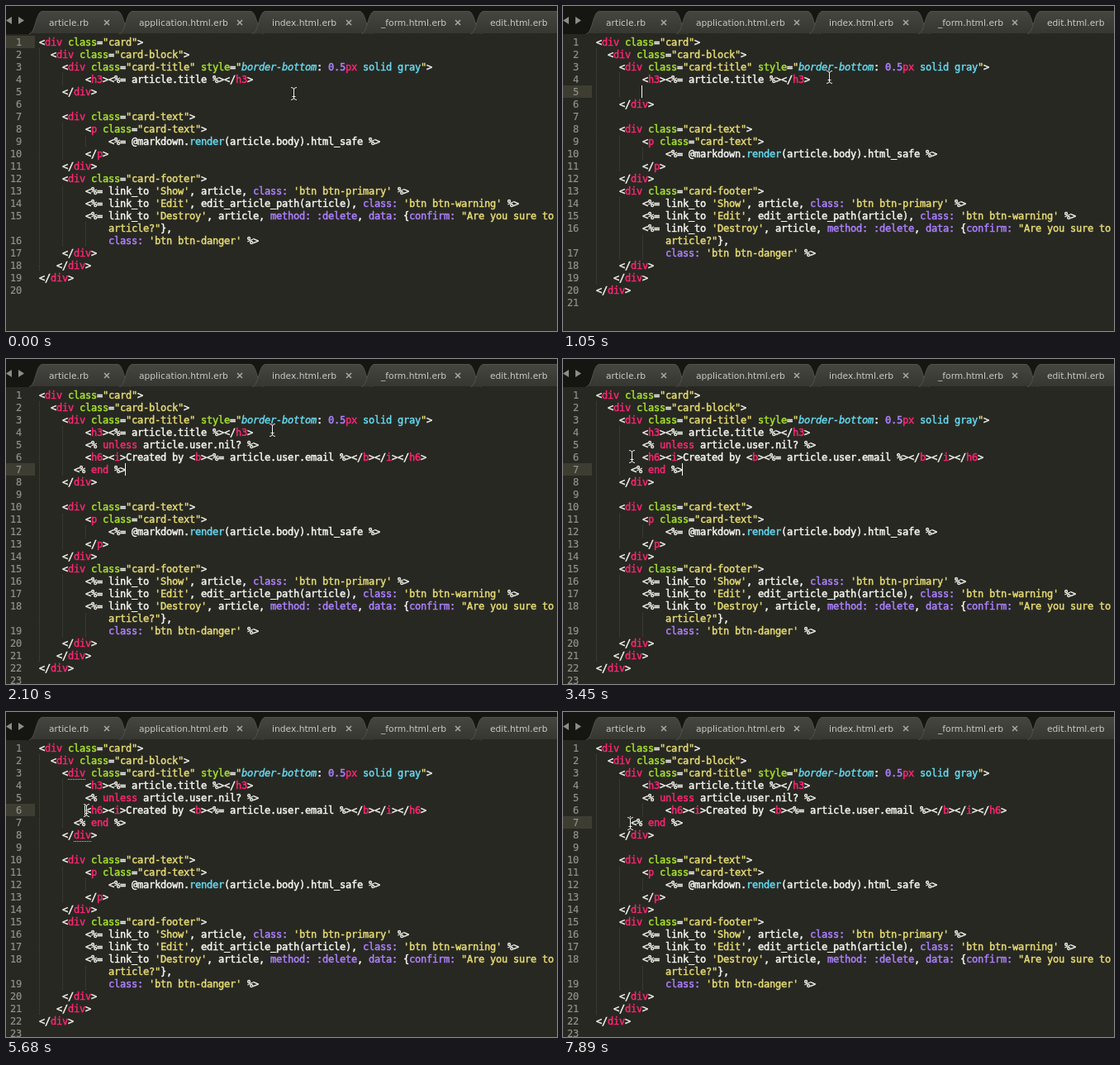
Recreate the animation shown at these times as an HTML page with a canvas. Size 667x393 px, loop 8 s.

```html
<!DOCTYPE html>
<html lang="en">
<head>
<meta charset="utf-8">
<title>Code editor</title>
<style>
  html, body { margin: 0; width: 100%; height: 100%; overflow: hidden; background: #272822; }
  canvas { display: block; }
</style>
</head>
<body>
<canvas id="stage" width="667" height="393"></canvas>
<script>
const ctx = document.getElementById('stage').getContext('2d');
const LOOP = 8000, TOP = 36, LEFT = 40, ROW = 15, CHAR = 7;
const MONO = '12px "DejaVu Sans Mono", monospace';
const COLORS = { pink: '#f92672', cyan: '#66d9ef', green: '#a6e22e', purple: '#ae81ff', yellow: '#e6db74' };
const PLAIN = '#f8f8f2';

const head = [
  '<div class="card">',
  '  <div class="card-block">',
  '    <div class="card-title" style="border-bottom: 0.5px solid gray">',
  '        <h3><%= article.title %></h3>'
];
const tail = [
  '    </div>',
  '',
  '    <div class="card-text">',
  '        <p class="card-text">',
  '            <%= @markdown.render(article.body).html_safe %>',
  '        </p>',
  '    </div>',
  '    <div class="card-footer">',
  "        <%= link_to 'Show', article, class: 'btn btn-primary' %>",
  "        <%= link_to 'Edit', edit_article_path(article), class: 'btn btn-warning' %>",
  `        <%= link_to 'Destroy', article, method: :delete, data: {confirm: "Are you sure to\n            article?"},`,
  "            class: 'btn btn-danger' %>",
  '    </div>',
  '   </div>',
  '</div>',
  ''
];
const blank = ['        '];
const pasted = [
  '        <% unless article.user.nil? %>',
  '        <h6><i>Created by <b><%= article.user.email %></b></i></h6>',
  '      <% end %>'
];
const indented = [pasted[0], '    ' + pasted[1], pasted[2]];

// The cursor starts a new blink with every edit or click.
const edits = [
  { start: -600, row: 0, col: 0, inserted: [] },
  { start: 300, row: 3, col: 37, inserted: [] },
  { start: 1050, row: 4, col: 8, inserted: blank },
  { start: 2100, row: 6, col: 15, inserted: pasted },
  { start: 5530, row: 5, col: 8, inserted: pasted, matched: true },
  { start: 6260, row: 5, col: 12, inserted: indented, matched: true },
  { start: 7890, row: 6, col: 6, inserted: indented }
];
// Each mouse move follows a curve from the last stop, pulled towards bend.
const moves = [
  { start: 149, end: 150, bend: [335, 96], to: [322, 86] },
  { start: 2450, end: 3400, bend: [200, 58], to: [83, 118] },
  { start: 3550, end: 4900, bend: [84, 104], to: [97, 119] },
  { start: 6650, end: 7750, bend: [78, 150], to: [81, 135] }
];

const clamp = value => Math.min(1, Math.max(0, value));
const ease = p => p * p * (3 - 2 * p);
const blink = age => clamp(.5 + 4 * Math.cos(2 * Math.PI * (age - 150) / 1050));

function mouseAt(t) {
  return moves.reduce((from, { start, end, bend, to }) => {
    const p = ease(clamp((t - start) / (end - start))), q = 1 - p;
    return from.map((v, i) => q * q * v + 2 * q * p * bend[i] + p * p * to[i]);
  }, [348, 106]);
}

const syntax = new RegExp([
  /(?<pink>(?<=<\/?)(?:div|h3|h6|p|i|b)\b|(?<=\d)px|\b(?:unless|end)\b)/,
  /(?<cyan>border-bottom|solid gray|\brender\b)/,
  /(?<green>(?:class|style)(?==))/,
  /(?<purple>\w+:(?= )|:delete|0\.5)/,
  /(?<yellow>"Are you sure to|article\?"|'[^']*'|"[\w-]*"|")/
].map(rule => rule.source).join('|'), 'g');

function drawChars(text, x, y, color, weight = .45) {
  ctx.fillStyle = ctx.strokeStyle = color;
  ctx.lineWidth = weight;
  [...text].forEach((char, i) => {
    if (char === ' ') return;
    ctx.fillText(char, x + i * CHAR, y);
    ctx.strokeText(char, x + i * CHAR, y);
  });
}

function drawCode(text, y) {
  let last = 0;
  const plain = end => drawChars(text.slice(last, end), LEFT + last * CHAR, y, PLAIN);
  for (const match of text.matchAll(syntax)) {
    plain(match.index);
    const kind = Object.keys(COLORS).find(name => match.groups[name]);
    ctx.font = (match[0] === 'border-bottom' ? 'italic ' : '') + MONO;
    drawChars(match[0], LEFT + match.index * CHAR, y, COLORS[kind]);
    ctx.font = MONO;
    last = match.index + match[0].length;
  }
  plain(text.length);
}

function drawGuides(text, y) {
  const indent = text.search(/\S|$/);
  ctx.fillStyle = '#484943';
  for (let col = 0; col < indent; col += 4)
    for (let dy = 0; dy < ROW; dy++)
      if ((y + dy) % 2) ctx.fillRect(LEFT + col * CHAR, y + dy, 1, 1);
}

function drawMatch(row, col) {
  ctx.fillStyle = '#c8c8c2';
  for (let x = 0; x < 3 * CHAR; x += 2)
    ctx.fillRect(LEFT + col * CHAR + x, TOP + (row + 1) * ROW, 1, 1);
}

function drawEditor(t) {
  const { start, row, col, inserted, matched } = edits.findLast(edit => edit.start <= t);
  const lines = [...head, ...inserted, ...tail];
  ctx.fillStyle = '#272822';
  ctx.fillRect(0, 0, 667, 393);
  ctx.fillStyle = '#3e3d32';
  ctx.fillRect(0, TOP + row * ROW, 35, ROW);
  ctx.font = MONO;
  let y = TOP;
  lines.forEach((line, i) => {
    drawChars(String(i + 1).padStart(2), 5, y + 12, '#8f908a', .2);
    for (const text of line.split('\n')) {
      drawGuides(text || lines[i + 1] || '', y);
      drawCode(text, y + 12);
      y += ROW;
    }
  });
  if (matched) {
    drawMatch(2, 5);
    drawMatch(7, 6);
  }
  ctx.globalAlpha = blink(t - start);
  ctx.fillStyle = PLAIN;
  ctx.fillRect(LEFT + col * CHAR - 1, TOP + row * ROW, 1, ROW);
  ctx.globalAlpha = 1;
}

function drawTab(left, width, label) {
  const right = left + width, closeX = right - 23;
  const fill = ctx.createLinearGradient(0, 6, 0, 33);
  fill.addColorStop(0, '#454640');
  fill.addColorStop(1, '#363731');
  ctx.beginPath();
  ctx.moveTo(left - 8, 33.5);
  ctx.bezierCurveTo(left, 33, left, 6.5, left + 8, 6.5);
  ctx.lineTo(right - 10, 6.5);
  ctx.bezierCurveTo(right - 2, 6.5, right - 2, 33, right + 6, 33.5);
  ctx.fillStyle = fill;
  ctx.fill();
  ctx.lineWidth = 1;
  ctx.strokeStyle = '#50514b';
  ctx.stroke();
  ctx.fillStyle = '#c9c9c5';
  ctx.fillText(label, left + 16, 24);
  ctx.beginPath();
  for (const side of [-3, 3]) {
    ctx.moveTo(closeX - side, 17);
    ctx.lineTo(closeX + side, 23);
  }
  ctx.lineWidth = 1.5;
  ctx.strokeStyle = '#aaaaa5';
  ctx.stroke();
}

function drawArrow(tip, base) {
  ctx.beginPath();
  ctx.moveTo(tip, 17.5);
  ctx.lineTo(base, 13);
  ctx.lineTo(base, 22);
  ctx.fillStyle = '#8c8c88';
  ctx.fill();
}

function drawTabBar() {
  ctx.fillStyle = '#151612';
  ctx.fillRect(0, 0, 667, 34);
  ctx.font = '10.7px "DejaVu Sans", sans-serif';
  let left = 36;
  for (const label of ['article.rb', 'application.html.erb', 'index.html.erb', '_form.html.erb', 'edit.html.erb']) {
    const width = Math.round(Math.max(ctx.measureText(label).width + 53, label.length > 10 ? 132 : 109));
    drawTab(left, width, label);
    left += width;
  }
  drawArrow(0, 7);
  drawArrow(22, 15);
}

function drawMouse(t) {
  const [x, y] = mouseAt(t).map(Math.round);
  ctx.save();
  ctx.translate(x + .5, y);
  ctx.beginPath();
  for (const end of [-1, 1]) {
    ctx.moveTo(-3.5, end * 7.5);
    ctx.quadraticCurveTo(0, end * 7.5, 0, end * 5);
    ctx.quadraticCurveTo(0, end * 7.5, 3.5, end * 7.5);
  }
  ctx.moveTo(0, -6);
  ctx.lineTo(0, 6);
  ctx.moveTo(-2, 3.5);
  ctx.lineTo(2, 3.5);
  ctx.strokeStyle = '#1c1d18';
  ctx.lineWidth = 2;
  ctx.stroke();
  ctx.strokeStyle = '#f4f4f0';
  ctx.lineWidth = 1;
  ctx.stroke();
  ctx.restore();
}

function frame() {
  const t = performance.now() % LOOP;
  drawEditor(t);
  drawTabBar();
  drawMouse(t);
  requestAnimationFrame(frame);
}
frame();
</script>
</body>
</html>
```
